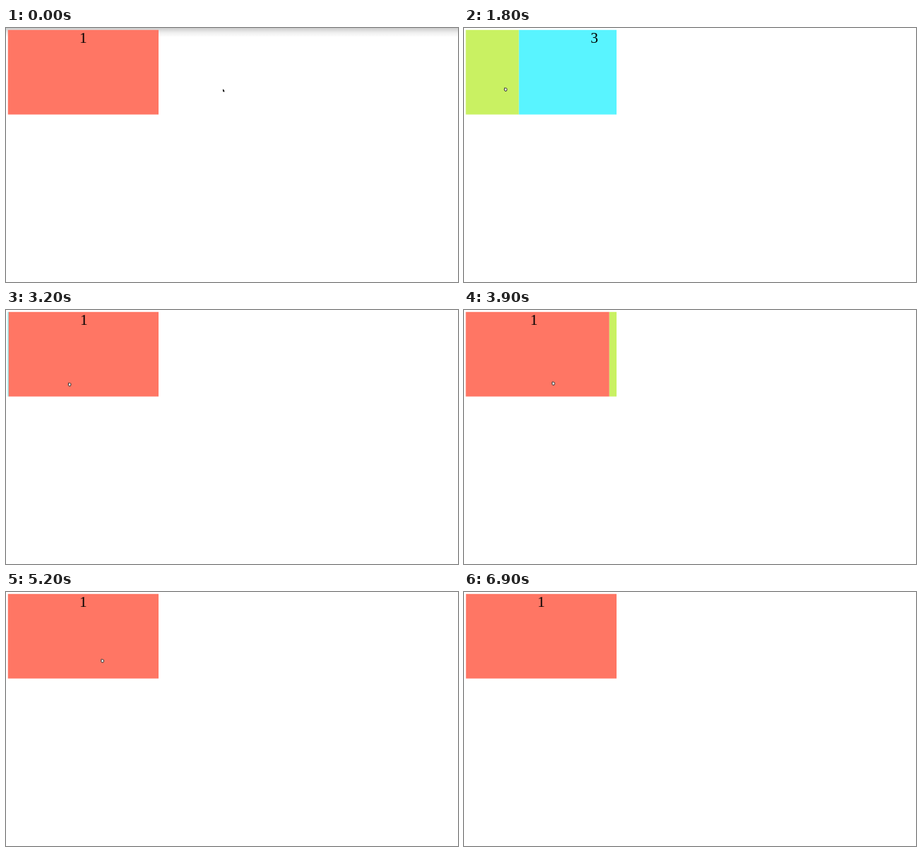
Write an HTML page with a canvas that moves like this. It is 640 by 360 pixels and loops after 7000 ms.

```html
<!DOCTYPE html>
<html lang="en">
<head>
<meta charset="utf-8">
<title>Swipe carousel</title>
<style>
  html, body { margin: 0; width: 100%; height: 100%; overflow: hidden; background: #fff; }
  canvas { display: block; }
</style>
</head>
<body>
<canvas id="stage" width="640" height="360"></canvas>
<script>
const ctx = document.getElementById('stage').getContext('2d');
const LOOP = 7000, STEP = 100;
const BOX = { x: 2.5, y: 2.5, w: 213.5, h: 120.3 };
const COLORS = ['#ff7664', '#c9f162', '#59f4ff'];
const SWIPE = 550, DRAG = 300, REACH = 60;

// Each swipe: start, direction, leftmost point of the hand
const swipes = [
  { start: 739, dir: 1, x: 81, y: 68 },
  { start: 1502, dir: 1, x: 58.5, y: 87 },
  { start: 2700, dir: 1, x: 90, y: 105.5 },
  { start: 3830, dir: 1, x: 80.5, y: 104 },
  { start: 4380, dir: -1, x: 76.5, y: 97.5 },
  { start: 5330, dir: 1, x: 76.5, y: 97.5 },
  { start: 6050, dir: -1, x: 76.5, y: 97.5 }
];

// The hand drags, rests until the slide settles, then heads for the next swipe
const path = [{ t: 0, x: 308, y: 88.5 }, { t: 300, x: 308, y: 88.5 }];
for (const { start, dir, x, y } of swipes) {
  const right = x + REACH;
  const from = dir > 0 ? right : x, to = dir > 0 ? x : right;
  path.push({ t: start, x: from, y }, { t: start + DRAG, x: to, y }, { t: start + SWIPE, x: to, y });
}
path.push({ t: 6750, x: 281, y: 138 }, { t: LOOP, x: 281, y: 138 });

const mix = (a, b, k) => a + (b - a) * k;
const clamp = v => Math.max(0, Math.min(1, v));
const ease = u => 1 - (1 - u * u) ** 3;

function slidePosition(t) {
  return swipes.reduce((sum, s) => sum + s.dir * ease(clamp((t - s.start) / SWIPE)), 0);
}

function pointerAt(t) {
  const i = path.findIndex(p => p.t > t);
  const a = path[i - 1], b = path[i], k = (t - a.t) / (b.t - a.t);
  return { x: mix(a.x, b.x, k), y: mix(a.y, b.y, k) };
}

function drawSlides(t) {
  const pos = slidePosition(t), first = Math.floor(pos + 1e-6);
  ctx.save();
  ctx.beginPath();
  ctx.rect(BOX.x, BOX.y, BOX.w, BOX.h);
  ctx.clip();
  ctx.font = '21.33px "Liberation Serif", Times, serif';
  ctx.textAlign = 'center';
  // The row of slides repeats endlessly
  for (let n = first; n <= first + 1; n++) {
    const slide = n % COLORS.length;
    const x = BOX.x + (n - pos) * BOX.w, mid = x + BOX.w / 2;
    ctx.fillStyle = COLORS[slide];
    ctx.fillRect(x, BOX.y, BOX.w, BOX.h);
    if (slide === 1 && t >= 3900 && t < 4500) {
      ctx.fillStyle = '#a3c9bd';
      ctx.fillRect(mid - 5.3, BOX.y, 10.6, 23.3);
    }
    ctx.fillStyle = '#000';
    ctx.fillText(slide + 1, mid, 21.4);
  }
  ctx.restore();
}

function drawShade(t) {
  const alpha = 0.2 * clamp(1 - t / 200);
  const shade = ctx.createLinearGradient(0, 0, 0, 13);
  shade.addColorStop(0, `rgba(0,0,0,${alpha})`);
  shade.addColorStop(0.5, `rgba(0,0,0,${alpha / 3})`);
  shade.addColorStop(1, 'rgba(0,0,0,0)');
  ctx.fillStyle = shade;
  ctx.fillRect(0, 0, 640, 13);
}

const ARROW = new Path2D('M-1 -2.2V1.9L0 1.1L.6 2.5L1.3 2.2L.7 .9H1.8Z');
const HAND = new Path2D('M-1.8 -1.9Q-1 -2.7 -.4 -1.8Q.5 -2.4 1 -1.5Q1.9 -1.7 1.9 -.6V.6L1.2 2.3H-.9L-2 .5Q-2.2 -.3 -1.3 -.1Z');

function drawPointer(t) {
  if (t >= 6800) return;
  const { x, y } = pointerAt(t);
  const over = x < BOX.x + BOX.w && y < BOX.y + BOX.h;
  ctx.save();
  ctx.translate(x, y);
  ctx.fillStyle = over ? '#eee' : '#000';
  ctx.fill(over ? HAND : ARROW);
  if (over) {
    ctx.lineWidth = 0.9;
    ctx.strokeStyle = '#222';
    ctx.stroke(HAND);
  }
  ctx.restore();
}

const begin = performance.now();
function frame() {
  const t = Math.floor((performance.now() - begin) % LOOP / STEP) * STEP;
  ctx.fillStyle = '#fff';
  ctx.fillRect(0, 0, 640, 360);
  drawShade(t);
  drawSlides(t);
  drawPointer(t);
  requestAnimationFrame(frame);
}
frame();
</script>
</body>
</html>
```
